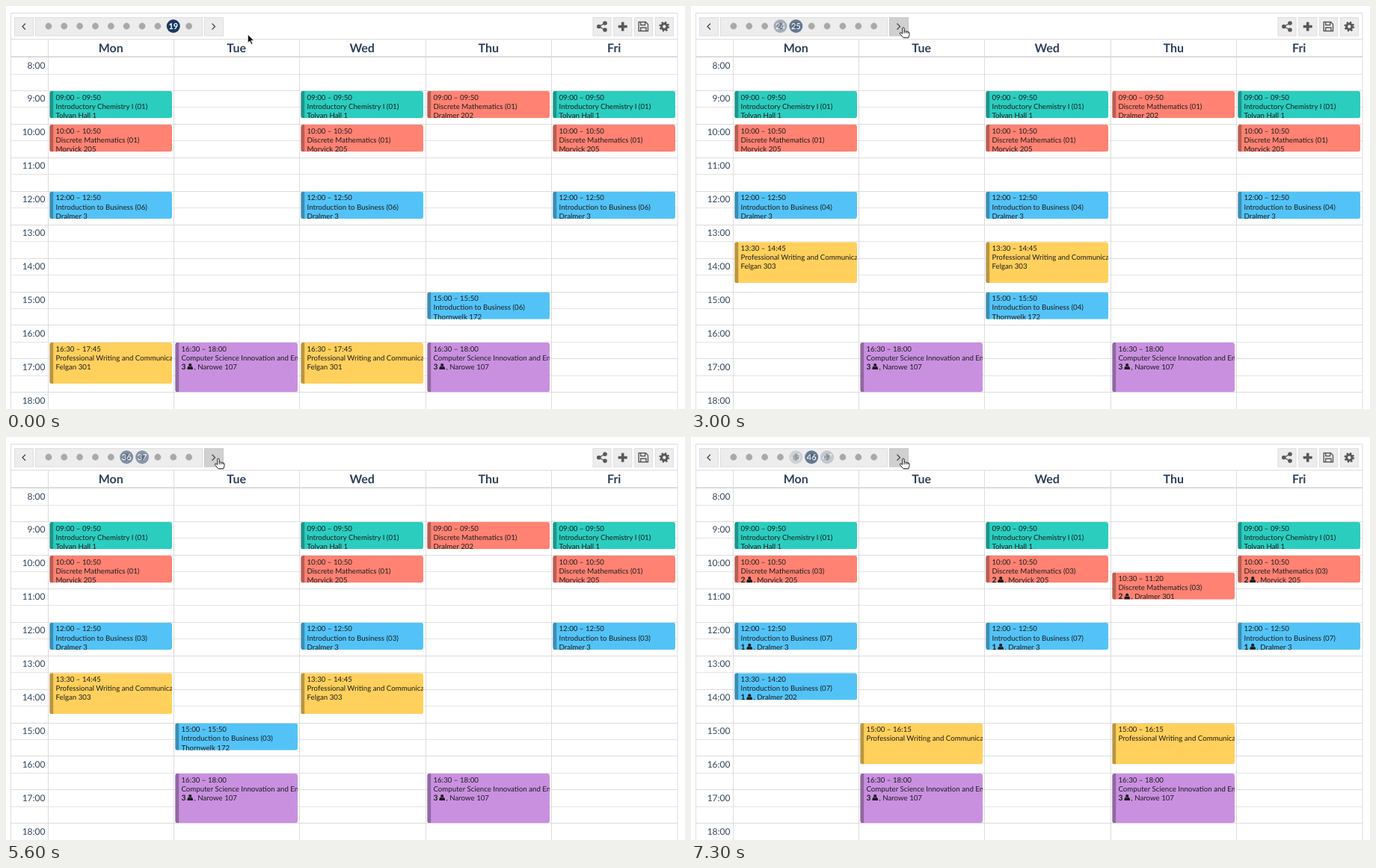
Recreate the animation shown at these times as an HTML page. Size 908 px wide and 540 px high, loop 7.4 s.

```html
<!DOCTYPE html>
<html lang="en">
<head>
<meta charset="utf-8">
<title>Weekly schedule</title>
<style>
html, body { margin: 0; width: 100%; height: 100%; overflow: hidden; background: #fff; }
svg { display: block; }
text { font-family: Lato, sans-serif; text-rendering: geometricPrecision; }
.grid { fill: none; stroke: #dcdcdc; }
.half { stroke: #e4e4e4; }
.hour { font-size: 12px; fill: #34475c; text-anchor: end; }
.day { font-size: 16px; font-weight: 700; fill: #2f415a; text-anchor: middle; }
.button { fill: #ededed; stroke: #dedede; }
.button.hover { fill: #d0d0d0; stroke: #c8c8c8; }
.chevron { fill: none; stroke: #484848; stroke-width: 1.3; }
.number { font-size: 11px; font-weight: 700; fill: #fff; text-anchor: middle; }
.event text { font-size: 9.7px; fill: #1c1c1c; }
.event .people { font-size: 10.3px; font-weight: 700; }
.icon { fill: #585858; }
.line { fill: none; stroke: #585858; stroke-width: 1.4; }
</style>
</head>
<body>
<svg id="stage" width="908" height="540" viewBox="0 0 908 540">
  <g id="grid"></g>
  <g id="toolbar">
    <rect class="button" x="11.5" y="15.5" width="25" height="24.5"/>
    <rect class="button" x="39.5" y="15.5" width="223" height="24.5"/>
    <rect class="button" id="next" x="265.5" y="15.5" width="25" height="24.5"/>
    <path class="chevron" d="M26 23.5l-4 4 4 4M275.5 23.5l4 4-4 4"/>
    <g id="actions"></g>
    <g class="icon">
      <circle cx="792.8" cy="27.5" r="2.8"/><circle cx="801" cy="23" r="2.8"/><circle cx="801" cy="32" r="2.8"/>
      <path class="line" d="M801 23l-8.2 4.5 8.2 4.5"/>
      <path d="M822.9 21.5h3.6v4.2h4.2v3.6h-4.2v4.2h-3.6v-4.2h-4.2v-3.6h4.2z"/>
      <path class="line" d="M846.2 21.5h9.3l3 3v9h-12.3zM848.7 21.5v4h6v-4M848.7 33.5v-4.5h7.3v4.5"/>
    </g>
    <circle class="line" cx="880.3" cy="27.5" r="3.7" style="stroke-width:3"/>
    <circle class="line" cx="880.3" cy="27.5" r="5.7" style="stroke-width:2.3" stroke-dasharray="2.24 2.24"/>
  </g>
  <g id="dots"></g>
  <g id="events"></g>
  <path id="arrow" fill="#111" stroke="#fff" stroke-width=".8" d="M0 0v11.5l2.7-2.5 2 4.6 1.9-.8-2-4.5h3.7z"/>
  <path id="hand" fill="#fff" stroke="#222" stroke-width="1" stroke-linejoin="round"
    d="M-1.3 1Q0-.8 1.2 1V5.4Q2.5 4.3 3.6 5.6 5 4.8 6 6.2 7.6 5.6 8 7.4V10L6.8 14H0L-4.6 8.6Q-5 6.8-3.2 7.1L-1.3 8.6ZM1.2 5.4V8M3.6 5.8V8M6 6.4V8"/>
</svg>
<script>
const $ = id => document.getElementById(id);
const LOOP = 7400, STEP = 100, FADE = 200, CONTENT_DELAY = 80;
const FIRST = 19, LAST = 47;
const TOP = 69.1, HOUR = 44.92, LEFT = 56, COLUMN = 168.4;
const COLOR = { chem: '#2bcdbf', math: '#ff8273', biz: '#53c3f7', writing: '#ffd05c', cs: '#c990e0' };
const hourY = h => TOP + (h - 8) * HOUR;
const dayX = d => Math.floor(LEFT + COLUMN * d);
const clamp = v => Math.max(0, Math.min(1, v));

// Click anchors [ms, schedule number]; clicks between anchors are evenly spaced.
const ANCHORS = [[1450, 20], [2060, 22], [2340, 23], [3665, 28], [4760, 32],
  [6100, 41], [6310, 42], [7130, 46], [7260, 47]];
const clicks = { [FIRST]: -1e4 };
ANCHORS.forEach(([time, n], i) => {
  const [nextTime, nextN] = ANCHORS[i + 1] || [time, n + 1];
  for (let k = n; k < nextN; k++) clicks[k] = time + (nextTime - time) * (k - n) / (nextN - n);
});

// Runs of [first schedule, business section, writing section]; the math section cycles within a run.
const RUNS = [[19, 6, 1], [22, 3, 1], [25, 4, 2], [28, 5, 2], [31, 8, 2],
  [34, 6, 2], [37, 3, 2], [41, 5, 2], [44, 7, 3]];
const MATH_LAB = { 1: [9, 'Dralmer 202'], 2: [12, 'Thornwelk 278'], 3: [10.5, 'Dralmer 301', 2] };
const BIZ_LAB = {
  3: [1, 15, 'Thornwelk 172'], 4: [2, 15, 'Thornwelk 172'], 5: [3, 13.5, 'Thornwelk 172'],
  6: [3, 15, 'Thornwelk 172'], 7: [0, 13.5, 'Dralmer 202', 1], 8: [2, 15, 'Thornwelk 276']
};
const WRITING = { 1: [[0, 2], 16.5, 'Felgan 301'], 2: [[0, 2], 13.5, 'Felgan 303'], 3: [[1, 3], 15, ''] };

const clock = h => {
  const m = Math.round(h * 60);
  return [Math.floor(m / 60), m % 60].map(v => String(v).padStart(2, '0')).join(':');
};

function eventBox(day, start, minutes, kind, title, room, people) {
  const height = HOUR * minutes / 60 - 1.1;
  const place = people
    ? `<text class="people" x="8.3" y="36">${people}</text>
       <g transform="translate(20 36)" fill="#1c1c1c"><circle cy="-5.9" r="2.1"/>
       <path d="M-3.8 0Q-4-3.8-1.8-4.1Q0-2.9 1.8-4.1Q4-3.8 3.8 0Z"/></g>
       <text x="25.3" y="36">, ${room}</text>`
    : `<text x="8.3" y="36">${room}</text>`;
  return `<svg class="event" x="${dayX(day) + 2.2}" y="${hourY(start)}" width="163.8" height="${height}">
    <rect width="100%" height="100%" rx="3" fill="${COLOR[kind]}"/>
    <path d="M5 0H3Q0 0 0 3V${height - 3}Q0 ${height} 3 ${height}H5Z" opacity=".28"/>
    <text x="8.3" y="11.6">${clock(start)} – ${clock(start + minutes / 60)}</text>
    <text x="8.3" y="23.8">${title}</text>${place}</svg>`;
}

function schedule(n) {
  const [runStart, biz, writing] = RUNS.findLast(run => run[0] <= n);
  const math = (n - runStart) % 3 + 1;
  const mathTitle = `Discrete Mathematics (0${math})`, bizTitle = `Introduction to Business (0${biz})`;
  const [mathStart, ...mathPlace] = MATH_LAB[math];
  const [bizDay, bizStart, ...bizPlace] = BIZ_LAB[biz];
  const [days, start, room] = WRITING[writing];
  return [
    ...[0, 2, 4].flatMap(d => [
      eventBox(d, 9, 50, 'chem', 'Introductory Chemistry I (01)', 'Tolvan Hall 1'),
      eventBox(d, 10, 50, 'math', mathTitle, 'Morvick 205', math === 3 ? 2 : 0),
      eventBox(d, 12, 50, 'biz', bizTitle, 'Dralmer 3', biz === 7 ? 1 : 0)
    ]),
    eventBox(3, mathStart, 50, 'math', mathTitle, ...mathPlace),
    eventBox(bizDay, bizStart, 50, 'biz', bizTitle, ...bizPlace),
    ...days.map(d => eventBox(d, start, 75, 'writing', 'Professional Writing and Communication', room)),
    ...[1, 3].map(d => eventBox(d, 16.5, 90, 'cs', 'Computer Science Innovation and Entrepreneurship', 'Narowe 107', 3))
  ].join('');
}

function buildStage() {
  let grid = '';
  for (let h = 8.5; h < 18.5; h += .5) {
    const y = Math.round(hourY(h)) - .5;
    grid += `<path class="grid ${h % 1 ? 'half' : ''}" d="M6 ${y}H898"/>`;
  }
  for (let h = 8; h <= 18; h++) grid += `<text class="hour" x="52.5" y="${hourY(h) + 14.4}">${h}:00</text>`;
  ['Mon', 'Tue', 'Wed', 'Thu', 'Fri'].forEach((name, d) => {
    grid += `<path class="grid" d="M${dayX(d) + .5} 44V540"/>
      <text class="day" x="${dayX(d) + COLUMN / 2}" y="61.7">${name}</text>`;
  });
  grid += `<path class="grid" d="M6.5 540V9.5H898V540M6 44.5H898"/>
    <path class="grid" stroke-width="2" d="M6 68H898"/>`;
  $('grid').innerHTML = grid;
  $('actions').innerHTML = [0, 1, 2, 3].map(i =>
    `<rect class="button" x="${785 + i * 27.8}" y="15.5" width="24" height="24.5"/>`).join('');
  $('dots').innerHTML = Array.from({ length: 10 }, (_, i) =>
    `<g transform="translate(${56.9 + 20.86 * i} 27)"><circle r="4.4" fill="#a9a9a9"/>
     <g><circle r="9" fill="#1b3a60"/><text class="number" y="4"></text></g></g>`).join('');
}

buildStage();
const badges = [...$('dots').children].map(dot => dot.lastElementChild);
let shown = 0;

function drawPages(t) {
  let current = FIRST;
  badges.forEach(b => b.setAttribute('opacity', 0));
  for (let n = FIRST; n <= LAST && clicks[n] <= t; n++) {
    if (clicks[n] + CONTENT_DELAY <= t) current = n;
    const end = n < LAST ? clicks[n + 1] : Infinity;
    const alpha = clamp((t - clicks[n]) / FADE) - clamp((t - end) / FADE);
    if (alpha <= 0) continue;
    const badge = badges[(n - 1) % 10];
    badge.setAttribute('opacity', alpha);
    badge.lastElementChild.textContent = n;
  }
  if (current !== shown) $('events').innerHTML = schedule(shown = current);
}

function drawCursor(t) {
  const u = clamp((t - 300) / 800), ease = u * u * (3 - 2 * u);
  const x = 323.3 - 39.3 * ease, y = 38 - 9.4 * ease, over = x < 291;
  $('next').classList.toggle('hover', over);
  for (const id of ['arrow', 'hand']) {
    $(id).setAttribute('transform', `translate(${x} ${y})`);
    $(id).style.display = (id === 'hand') === over ? '' : 'none';
  }
}

function frame() {
  const t = Math.floor(performance.now() % LOOP / STEP) * STEP;
  drawPages(t);
  drawCursor(t);
  requestAnimationFrame(frame);
}
frame();
</script>
</body>
</html>
```
